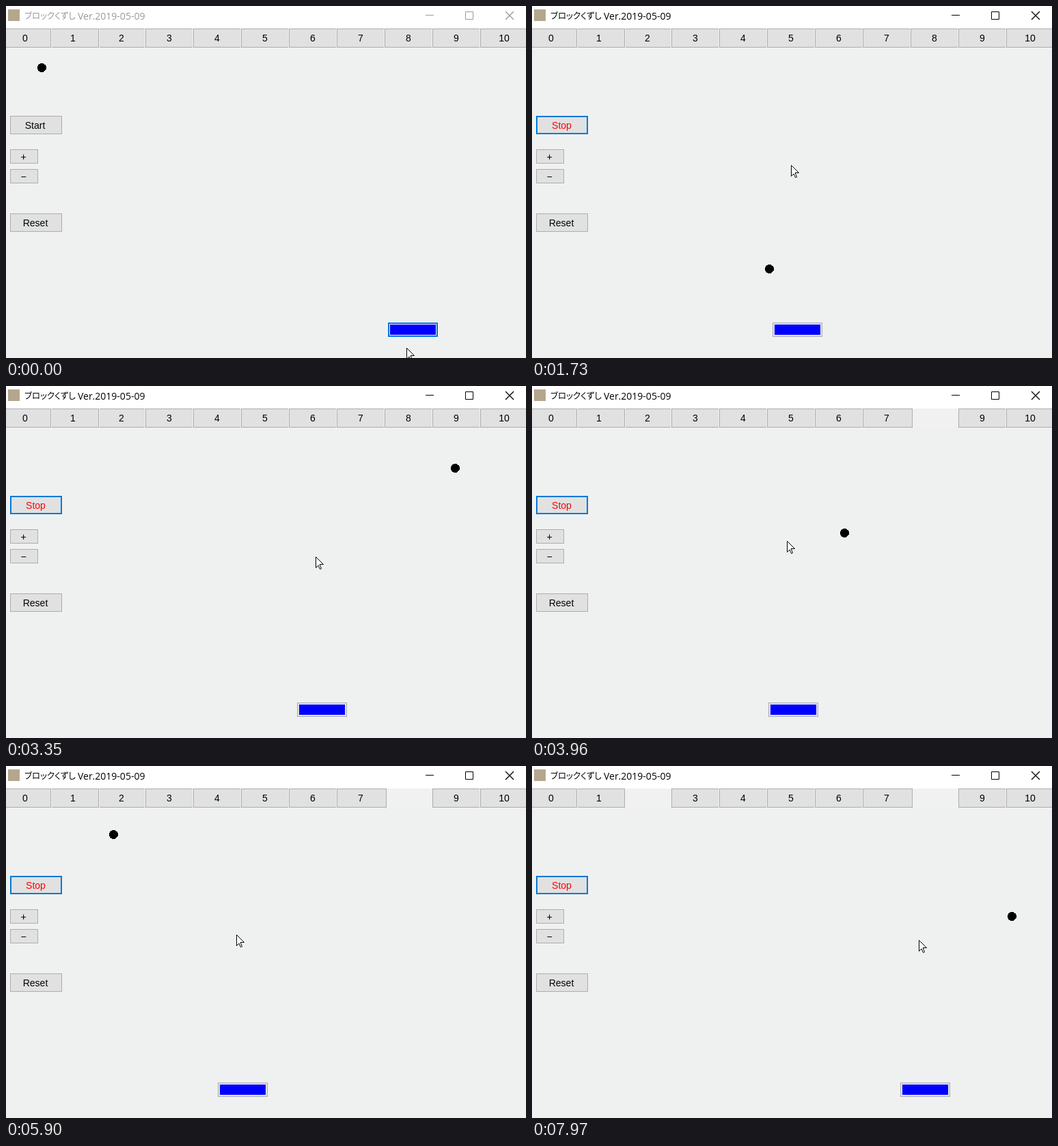
An HTML page that plays this animation: 761 px wide and 516 px high, repeating every 8 s.

```html
<!DOCTYPE html>
<html lang="ja">
<head>
<meta charset="utf-8">
<title>ブロックくずし</title>
<style>
  html, body { margin: 0; width: 100%; height: 100%; overflow: hidden; background: #eff1f0; }
  svg { display: block; }
  rect, circle { shape-rendering: crispEdges; }
  text { font: 14px "Liberation Sans", sans-serif; text-anchor: middle; }
  #title text { text-anchor: start; fill: currentColor; }
  #title .kana { font: 12.5px "Noto Sans CJK JP", "Noto Sans CJK", sans-serif; font-feature-settings: "palt"; }
  #title .version { font: 14px "Open Sans", sans-serif; }
  #title path { fill: none; stroke: currentColor; }
</style>
</head>
<body>
<svg width="761" height="516" viewBox="0 0 761 516">
  <g id="blocks"><rect y="33" width="761" height="28" fill="#f1f1f1"/></g>
  <g id="title">
    <rect width="761" height="33" fill="#fff"/>
    <rect x="3" y="5" width="17" height="17" fill="#b5a68e"/>
    <text class="kana" x="27" y="19">ブロックくずし</text>
    <text class="version" x="105" y="20">Ver.2019-05-09</text>
    <path d="M614 13.5h12M672.5 8.5h11v11h-11z"/>
    <path d="M731.500 8.500l11 11m0-11l-11 11" stroke-width="1.3" stroke-linecap="square"/>
  </g>
  <g id="buttons"></g>
  <g id="paddle">
    <rect id="frame"/>
    <rect id="lining" x="2" y="466" width="69" height="17" fill="#f4f4f4"/>
    <rect x="3" y="467" width="67" height="15" fill="#00f"/>
  </g>
  <circle id="ball" r="6.5"/>
  <path id="cursor" d="M.5 .5v16l3.500-3.500 2.500 5.500 2-.8-2.400-6.200h5.400z" fill="#fff" stroke="#000"/>
</svg>
<script>
const LOOP = 8000, REFRESH = 76.9, PHASE = 43;
const GRAY = '#adadad', FACE = '#e1e1e1', ACCENT = '#0078d7';
const LEFT = 7, RIGHT = 767, TOP = 67.5;
const FLOORS = [517.5, 457.5, 465];  // the first pass misses the paddle
const STEP = 5;
const ENTER = 8, PRESS = 10, LEAVE = 14;

// Key points by screen refresh: distance travelled by the ball, pointer position
const ballKeys = [[11.2, 0], [35, 600], [52, 1025], [77, 1625], [104, 2300]];
const pointerKeys = [[0, 586, 501], [ENTER, 18, 215], [PRESS, 40, 171], [LEAVE, 40, 171],
  [22, 371, 231], [35, 471, 255], [44, 453, 250], [52, 373, 227], [61, 205, 232],
  [75, 337, 247], [79, 337, 247], [91, 566, 255]];

const $ = id => document.getElementById(id);

function set(el, attrs) {
  for (const name in attrs) el.setAttribute(name, attrs[name]);
}

function add(parent, tag, attrs = {}, text = '') {
  const el = document.createElementNS('http://www.w3.org/2000/svg', tag);
  set(el, attrs);
  el.textContent = text;
  return parent.appendChild(el);
}

// A bordered box whose stroke stays inside its bounds.
function box(x, y, w, h, line = 1) {
  return { x: x + line / 2, y: y + line / 2, width: w - line, height: h - line, 'stroke-width': line };
}

function button(parent, x, y, w, h, label, labelX) {
  const group = add(parent, 'g');
  add(group, 'rect', { x: x - 1, y: y - 1, width: w + 2, height: h + 2, fill: '#f0f0f0' });
  const face = add(group, 'rect', { ...box(x, y, w, h), fill: FACE, stroke: GRAY });
  const text = add(group, 'text', { x: labelX, y: y + Math.ceil(h / 2) + 5 }, label);
  return { group, face, text };
}

const blocks = [];
for (let i = 10; i >= 0; i--) {
  const x = 70 * i - (i < 2 ? 7 : 6);
  blocks[i] = button($('blocks'), x, 33, 73, 28, i, x + 35);
  if (i > 1) $('blocks').children[0].after(blocks[i].group);
}

const startButton = button($('buttons'), 6, 161, 76, 27, 'Start', 42.5);
button($('buttons'), 6, 210, 41, 21, '+', 25.5);
button($('buttons'), 6, 239, 41, 21, '−', 25.5);
button($('buttons'), 6, 304, 76, 27, 'Reset', 43);

function along(keys, at) {
  const i = keys.findIndex(key => key[0] > at);
  if (i === 0) return keys[0].slice(1);
  if (i < 0) return keys[keys.length - 1].slice(1);
  const [from, to] = [keys[i - 1], keys[i]];
  const p = (at - from[0]) / (to[0] - from[0]);
  return from.slice(1).map((value, k) => value + (to[k + 1] - value) * p);
}

// Moves the ball step by step, bouncing off walls and knocking out blocks.
function play(steps) {
  let x = 52, y = 90, dx = STEP, dy = STEP, falls = 0;
  const hits = [];
  while (steps-- > 0) {
    x += dx;
    y += dy;
    const wall = dx > 0 ? RIGHT : LEFT;
    if ((x - wall) * dx > 0) {
      x = 2 * wall - x;
      dx = -dx;
    }
    const edge = dy > 0 ? FLOORS[falls] : TOP;
    if ((y - edge) * dy > 0) {
      y = 2 * edge - y;
      if (dy > 0) falls++;
      else hits.push(Math.floor((x + 6) / 70));
      dy = -dy;
    }
  }
  return { x, y, hits };
}

function draw(refresh) {
  const steps = Math.round(along(ballKeys, refresh)[0] / STEP);
  const { x, y, hits } = play(steps);
  set($('ball'), { cx: x + 0.5, cy: y + 0.5 });
  blocks.forEach((block, i) => block.group.style.display = hits.includes(i) ? 'none' : '');

  const [px, py] = along(pointerKeys, refresh).map(Math.round);
  set($('cursor'), { transform: `translate(${px} ${py})` });

  const hover = px >= 6 && px < 82 && py >= 161 && py < 188;
  const pressed = refresh >= PRESS, running = steps > 0;
  set(startButton.face, {
    ...box(6, 161, 76, 27, pressed && !hover ? 2 : 1),
    fill: hover ? '#e5f1fb' : FACE,
    stroke: hover || pressed ? ACCENT : GRAY
  });
  set(startButton.text, { fill: running ? '#f00' : '#000', x: running ? 43.5 : 42.5 });
  startButton.text.textContent = running ? 'Stop' : 'Start';

  // The paddle ignores the pointer while it is on the button.
  const held = refresh >= ENTER && refresh <= LEAVE;
  set($('paddle'), { transform: `translate(${held ? -9 : px - 27} 0)` });
  set($('frame'), {
    ...box(0, 464, 73, 21, pressed ? 1 : 2),
    fill: FACE, stroke: pressed ? GRAY : ACCENT
  });
  $('lining').style.display = pressed ? 'none' : '';
  $('title').style.color = pressed ? '#000' : '#999';
}

const began = performance.now();
function tick() {
  const t = (performance.now() - began) % LOOP;
  draw(Math.floor((t + PHASE) / REFRESH));
  requestAnimationFrame(tick);
}
tick();
</script>
</body>
</html>
```
